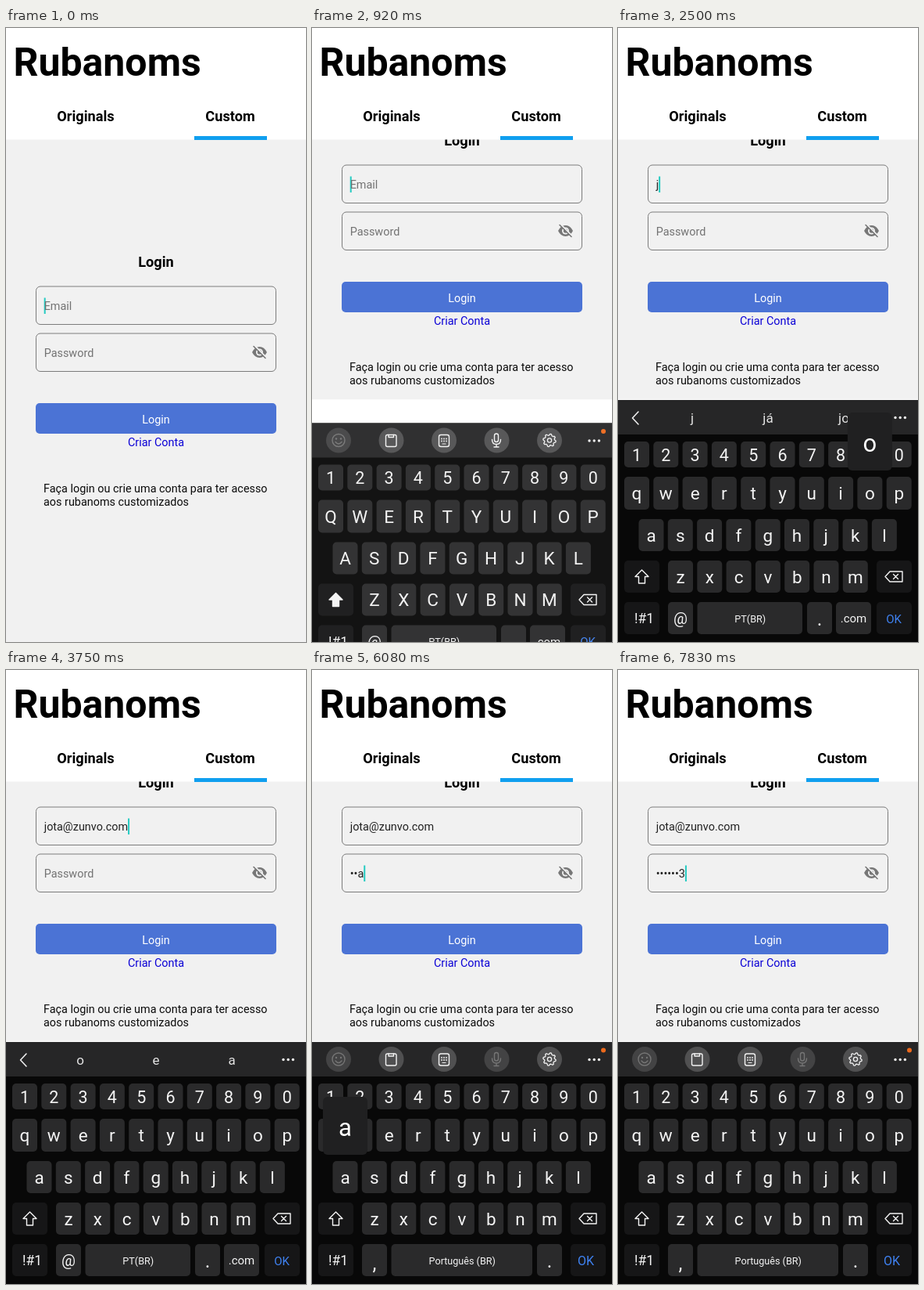
An HTML page for the animation above (8 s loop, 384 by 784 pixels).

```html
<!DOCTYPE html>
<html lang="pt-BR">
<head>
<meta charset="utf-8">
<title>Login</title>
<style>
html, body { margin: 0; width: 100%; height: 100%; overflow: hidden; background: #fff; }
svg { display: block; width: 384px; height: 784px; font-family: Roboto, sans-serif; }
</style>
</head>
<body>
<svg id="stage" viewBox="0 0 384 784"></svg>
<script>
const LOOP = 8000, RESIZE = 500, SLIDE = [420, 1080], NEXT_FIELD = 4250;
const FONT = 14.4, TEXT_X = 48.7;
const stage = document.getElementById('stage');
const pen = document.createElement('canvas').getContext('2d');

const EMAIL = [[2250, 'j'], [2580, 'jo'], [3330, 'jota@zunvo.com']];
const HINTS = [[2250, ['j', 'já', 'jo']], [2580, ['jo', 'jota@zunvo.com', 'jogo']], [3420, ['o', 'e', 'a']]];
const SECRET = [[5400, 'k'], [5680, 'o'], [6040, 'a'], [6250, 'i'], [7060, '1'], [7480, '2'], [7750, '3']];
// key, shown from, shown until
const POPUPS = [
  ['j', 2160, 2410], ['o', 2500, 2750], ['k', 5320, 5480], ['o', 5580, 5800], ['a', 5950, 6160],
  ['i', 6170, 6480], ['1', 6900, 7160], ['2', 7410, 7570], ['3', 7660, 7820]
];
const ROWS = [
  { keys: '1234567890', x: 24, y: 528, h: 33 },
  { keys: 'qwertyuiop', x: 24, y: 573, h: 42 },
  { keys: 'asdfghjkl', x: 42.5, y: 627, h: 41 },
  { keys: 'zxcvbnm', x: 80, y: 680, h: 41 }
];
const STEP = 37.3;

const latest = (list, t) => list.filter(e => e[0] <= t).pop();
const between = (t, a, b) => t >= a && t < b;
const rect = (x, y, w, h, fill, r = 0, more = '') =>
  `<rect x="${x}" y="${y}" width="${w}" height="${h}" rx="${r}" fill="${fill}" ${more}/>`;
const dot = (x, y, r, fill) => `<circle cx="${x}" cy="${y}" r="${r}" fill="${fill}"/>`;
const line = (d, color, width = 1.4, fill = 'none') =>
  `<path d="${d}" fill="${fill}" stroke="${color}" stroke-width="${width}" stroke-linejoin="round" stroke-linecap="round"/>`;
const text = (s, x, y, size, fill, anchor = 'middle', weight = 400) =>
  `<text x="${x}" y="${y}" font-size="${size}" fill="${fill}" text-anchor="${anchor}" font-weight="${weight}">${s}</text>`;

function textWidth(s) {
  pen.font = `${FONT}px Roboto, sans-serif`;
  return pen.measureText(s).width;
}

function field(y, value, hint, cursor) {
  let out = rect(38.5, y, 307, 48.5, 'none', 5.5, 'stroke="#7c7c7c"');
  if (cursor) out += rect(TEXT_X + textWidth(value), y + 14.5, 2, 20.5, '#25cbc2');
  return out + text(value || hint, TEXT_X, y + 30, FONT, value ? '#222' : '#737373', 'start');
}

function hiddenEye(x, y) {
  return `<g transform="translate(${x} ${y})">
    <path d="M-9.5 0Q-6-7 0-7T9.5 0Q6 7 0 7T-9.5 0Z" fill="#777"/>
    ${dot(0, 0, 4.5, '#f1f1f1')}${dot(0, 0, 2.7, '#777')}
    ${line('M-6.5-8.5L8.5 6.5', '#f1f1f1', 2)}${line('M-7.5-7.5L7.5 7.5', '#777', 1.6)}</g>`;
}

function form(email, secret, focus, cursorOn) {
  return text('Login', 192, 304.5, 18.2, '#000', 'middle', 700)
    + field(330, email, 'Email', cursorOn && focus === 0)
    + field(390, secret, 'Password', cursorOn && focus === 1)
    + hiddenEye(324.5, 414)
    + rect(38, 479, 308, 39, '#4b73d5', 5)
    + text('Login', 192, 504.5, FONT, '#fff')
    + text('Criar Conta', 192, 533.5, FONT, '#0c02d6')
    + text('Faça login ou crie uma conta para ter acesso', 48, 593, FONT, '#0c0c0c', 'start')
    + text('aos rubanoms customizados', 48, 609.5, FONT, '#0c0c0c', 'start');
}

function header() {
  return rect(0, 0, 384, 142.5, '#fff')
    + text('Rubanoms', 9.5, 60.5, 50, '#000', 'start', 700)
    + text('Originals', 102, 118.5, 18.2, '#000', 'middle', 700)
    + text('Custom', 287, 118.5, 18.2, '#000', 'middle', 700)
    + rect(241, 138, 93, 5, '#109fef');
}

function gear(x, y, color) {
  let d = '';
  for (let i = 0; i < 32; i++) {
    const a = (i + .5) / 32 * 2 * Math.PI, r = i % 4 < 2 ? 8.2 : 6.5;
    d += (i ? 'L' : 'M') + (x + r * Math.cos(a)).toFixed(2) + ' ' + (y + r * Math.sin(a)).toFixed(2);
  }
  return line(d + 'Z', color, 1.3)
    + `<circle cx="${x}" cy="${y}" r="2.6" fill="none" stroke="${color}" stroke-width="1.3"/>`;
}

function toolbar(hints, micDim) {
  let out = rect(0, 475, 384, 44, '#262627');
  for (let i = 0; i < 3; i++) out += dot(355 + 6.2 * i, 497.5, 1.7, '#eee');
  if (hints) {
    out += line('M26 490L18.5 498L26 506', '#eee', 1.6);
    return out + hints.map((s, i) => text(s, 95 + 97 * i, 503.5, s.length > 6 ? 12 : 17, '#e4e4e4')).join('');
  }
  const on = '#f2f2f2', off = '#757575', mic = micDim ? off : on;
  const outline = color => `stroke="${color}" stroke-width="1.4"`;
  for (let i = 0; i < 5; i++) out += dot(34 + 67.5 * i, 497, 16, i === 0 || i === 3 && micDim ? '#434344' : '#505051');
  out += line('M26 497a8 8 0 1 0 16 0a8 8 0 1 0-16 0M30 499q4 5 8 0', off)
    + dot(31, 495, 1.2, off) + dot(37, 495, 1.2, off);
  out += rect(94.5, 490, 13.5, 15, 'none', 2, outline(on)) + line('M98 490v3h6.5v-3', on);
  out += rect(162.5, 490, 13, 15, 'none', 2.5, outline(on)) + line('M167 501.5h4', on, 1.2);
  for (let i = 0; i < 6; i++) out += dot(166 + i % 3 * 3, 495 + (i / 3 | 0) * 3, .9, on);
  out += rect(233.5, 488.5, 5, 10.5, 'none', 2.5, outline(mic))
    + line('M230.5 496q0 6 5.5 6t5.5-6M236 502v3.5M233 505.5h6', mic);
  return out + gear(304, 497, on) + dot(373, 485.5, 3, '#ee6a1c');
}

function keyboard(upper, second, hints, shiftDown) {
  const key = '#2a2a2b', side = '#161617', ink = '#f4f4f4';
  let out = rect(0, 475, 384, 309, '#080808') + toolbar(hints, second);
  for (const row of ROWS) {
    [...row.keys].forEach((c, i) => {
      const x = row.x + STEP * i, size = row.h < 40 ? 21.5 : 22.5;
      out += rect(x - 16, row.y, 32, row.h, key, 5)
        + text(upper ? c.toUpperCase() : c, x, row.y + row.h / 2 + 8, size, ink);
    });
  }
  const wide = (x, y, fill = side) => rect(x, y, 45, 41, fill, 5);
  out += wide(8, 680, shiftDown ? '#4a4a4b' : side)
    + line('M30.5 692L39 700.5H34.5V709H26.5V700.5H22Z', ink, 1.4, upper ? ink : 'none');
  out += wide(331, 680) + line('M342 700.5L348 694H364V707H348ZM352.5 697.5L358.5 703.5M358.5 697.5L352.5 703.5', ink);
  out += wide(8, 733) + text('!#1', 33.5, 760, 17.5, ink);
  out += rect(64, 733, 32, 41, key, 5) + text(second ? ',' : '@', 80, second ? 766 : 761, second ? 25 : 20, ink);
  const end = second ? 282 : 236;
  out += rect(101.5, 733, end - 101.5, 41, key, 5)
    + text(second ? 'Português (BR)' : 'PT(BR)', (101.5 + end) / 2 + .5, 758.5, 12.6, ink);
  out += rect(end + 6, 733, 32, 41, key, 5) + text('.', end + 22, 763, 25, ink);
  if (!second) out += wide(279, 733, key) + text('.com', 301.5, 759, 15, ink);
  return out + wide(331, 733) + text('OK', second ? 350.5 : 353, 759.5, second ? 16 : 15, '#3f82f2');
}

function popup(char) {
  const row = ROWS.find(r => r.keys.includes(char));
  const x = Math.max(7, Math.min(320, row.x + STEP * row.keys.indexOf(char) - 28.5)), y = row.y - 82;
  return rect(x, y, 57, 74, '#202021', 6) + text(char, x + 28.5, y + 50, 31, '#fff');
}

function draw(t) {
  const email = (latest(EMAIL, t) || [0, ''])[1];
  const typed = SECRET.filter(e => e[0] <= t);
  const secret = typed.map((e, i) => i === typed.length - 1 ? e[1] : '•').join('');
  const second = t >= NEXT_FIELD;

  // the cursor blinks every 500 ms, counted from the last input
  const moments = [0, RESIZE, NEXT_FIELD, ...EMAIL.map(e => e[0]), ...SECRET.map(e => e[0])];
  const since = t - Math.max(...moments.filter(m => m <= t));
  const cursorOn = since % 1000 < 500;

  const raised = t >= RESIZE;
  let out = rect(0, 142, 384, raised ? 332.5 : 642, '#f1f1f1')
    + `<g transform="translate(0 ${raised ? -155 : 0})">${form(email, secret, second ? 1 : 0, cursorOn)}</g>`;
  if (raised) out += rect(0, 474.5, 384, 310, '#fff');
  out += header();

  if (t > SLIDE[0]) {
    const u = Math.min(1, (t - SLIDE[0]) / (SLIDE[1] - SLIDE[0]));
    const p = 1 - (1 - u) ** 1.65;
    const upper = t < 2000 || between(t, NEXT_FIELD, 5080);
    const shiftDown = between(t, 1830, 1980) || between(t, 4750, 4900);
    const hints = second ? null : (latest(HINTS, t) || [])[1];
    out += `<g transform="translate(0 ${(309 * (1 - p)).toFixed(1)})" opacity="${Math.min(1, p + .05).toFixed(3)}">`
      + keyboard(upper, second, hints, shiftDown) + '</g>';
    const shown = POPUPS.find(k => between(t, k[1], k[2]));
    if (shown) out += popup(shown[0]);
  }
  return out;
}

let last = '';
function tick() {
  const next = draw(performance.now() % LOOP);
  if (next !== last) stage.innerHTML = last = next;
  requestAnimationFrame(tick);
}
tick();
</script>
</body>
</html>
```
